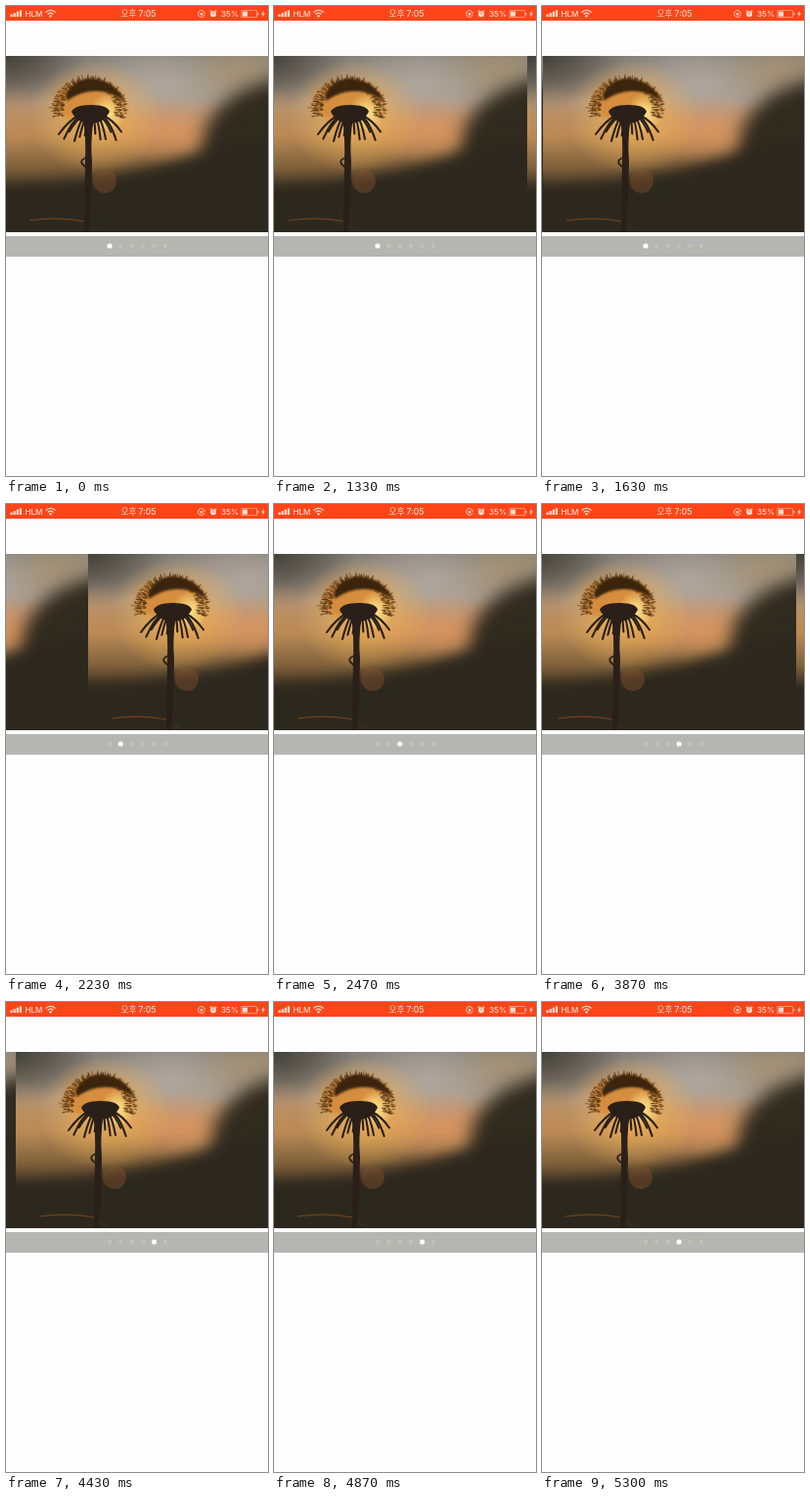
An HTML page with a canvas for the animation above (5.33 s loop, 268 by 480 pixels).

```html
<!DOCTYPE html>
<html lang="ko">
<head>
<meta charset="utf-8">
<title>Photo pager</title>
<style>
html, body { margin: 0; width: 100%; height: 100%; overflow: hidden; background: #fdfdfd; }
canvas { display: block; width: 100vw; height: 100vh; }
</style>
</head>
<body>
<canvas id="stage"></canvas>
<script>
const W = 268, H = 480, LOOP = 5330;
const PHOTO_Y = 51, PHOTO_H = 180;
const FONT = 'Inter, "Noto Sans CJK KR", "Noto Sans CJK", sans-serif';
const RED = '#ff4518', INK = '#ffdcd2', DARK = '#2a2019';
const scale = Math.max(1, window.devicePixelRatio || 1);

// Each swipe: start, end, page before, page after, flick strength
const swipes = [
  { start: 1300, end: 1700, from: 0, to: 1, flick: 5.4 },
  { start: 2100, end: 2470, from: 1, to: 2, flick: 8.7 },
  { start: 2770, end: 3100, from: 2, to: 3, flick: 5.3 },
  { start: 3840, end: 4330, from: 3, to: 4, flick: 8 },
  { start: 4400, end: 4930, from: 4, to: 3, flick: 10.6 },
  { start: 5000, end: 5300, from: 3, to: 2, flick: 7 }
];

function setup(canvas, w, h) {
  canvas.width = Math.round(w * scale);
  canvas.height = Math.round(h * scale);
  const g = canvas.getContext('2d');
  g.scale(scale, scale);
  return g;
}

function seeded(seed) {
  return () => (seed = (seed * 16807) % 2147483647) / 2147483647;
}

function glow(g, x, y, rx, ry, rgb, alpha) {
  g.save();
  g.translate(x, y);
  g.scale(rx, ry);
  const fill = g.createRadialGradient(0, 0, 0, 0, 0, 1);
  fill.addColorStop(0, `rgba(${rgb},${alpha})`);
  fill.addColorStop(0.45, `rgba(${rgb},${alpha * 0.62})`);
  fill.addColorStop(1, `rgba(${rgb},0)`);
  g.fillStyle = fill;
  g.fillRect(-1, -1, 2, 2);
  g.restore();
}

function soft(g, path, color, blur) {
  g.save();
  g.filter = `blur(${blur * scale}px)`;
  g.fillStyle = color;
  g.fill(new Path2D(path));
  g.restore();
}

function line(g, color, width, x1, y1, x2, y2, cx = (x1 + x2) / 2, cy = (y1 + y2) / 2) {
  g.strokeStyle = color;
  g.lineWidth = width;
  g.beginPath();
  g.moveTo(x1, y1);
  g.quadraticCurveTo(cx, cy, x2, y2);
  g.stroke();
}

function disc(g, x, y, r, color) {
  g.fillStyle = color;
  g.beginPath();
  g.arc(x, y, r, 0, Math.PI * 2);
  g.fill();
}

function drawSky(g) {
  const sky = g.createLinearGradient(0, 0, 0, PHOTO_H);
  sky.addColorStop(0, '#85807a');
  sky.addColorStop(0.25, '#a89684');
  sky.addColorStop(0.45, '#b48858');
  sky.addColorStop(0.62, '#84643c');
  sky.addColorStop(0.78, '#3a3022');
  g.fillStyle = sky;
  g.fillRect(0, 0, W, PHOTO_H);

  glow(g, 0, 0, 85, 55, '56,54,46', 0.85);
  glow(g, 160, 28, 80, 48, '178,172,164', 0.8);
  glow(g, 170, 76, 75, 36, '226,152,98', 0.75);
  glow(g, 92, 62, 70, 58, '250,182,84', 0.85);
  glow(g, 240, 12, 60, 36, '176,152,110', 0.6);
  glow(g, 10, 66, 40, 36, '206,140,72', 0.45);
}

function drawGround(g) {
  soft(g, 'M290 18 L250 32 Q228 40 212 60 Q196 78 204 112 L290 150 Z', '#302b1f', 9);
  soft(g, 'M-30 132 Q60 134 130 117 Q190 104 215 92 L300 80 V210 H-30 Z', '#2d281e', 7);
  disc(g, 101, 128, 12, 'rgba(140,84,44,0.4)');
  line(g, '#70431a', 1.2, 24, 168, 80, 169, 55, 164);
  line(g, '#49301a', 1, 78, 171, 94, 178);
}

function drawFlower(g) {
  const rand = seeded(77);
  const cx = 85, cy = 54;
  g.lineCap = 'round';

  // Backlit crown with a fuzzy dark rim
  soft(g, 'M50 58 Q44 26 85 25 Q126 26 121 60 L104 64 L66 64 Z', 'rgba(212,132,48,0.75)', 2.5);
  glow(g, 104, 58, 18, 20, '255,228,140', 1);
  soft(g, 'M62 38 Q72 22 88 23 Q112 25 121 46 Q108 35 92 36 Q78 35 62 46 Z', '#38240f', 1.3);
  for (let i = 0; i < 360; i++) {
    const a = Math.PI * (0.9 + 1.2 * rand());
    const r = 0.68 + 0.3 * rand();
    const x = cx + Math.cos(a) * 38 * r, y = cy + Math.sin(a) * 32 * r;
    const len = 1 + 3 * rand();
    line(g, 'rgba(70,42,14,0.5)', 1.1, x, y, x + Math.cos(a) * len, y + Math.sin(a) * len);
  }

  // Seed head and hanging bracts
  soft(g, 'M67 57 Q70 50 87 50 Q104 50 106 57 Q100 69 87 69 Q73 69 67 57 Z', DARK, 0.6);
  for (let i = 0; i < 13; i++) {
    const s = i / 6 - 1;
    const len = 18 + 5 * Math.sin(i * 2.4) - 4 * s * s;
    line(g, DARK, 2.1, 87 + s * 13, 61, 86 + s * 32, 66 + len, 87 + s * 23, 66);
  }

  // Stem
  soft(g, 'M79 64 H90 Q86 84 88 108 L87 150 L85 180 H80 L81 108 Q82 84 79 64 Z', DARK, 0.6);
  line(g, DARK, 1.8, 82, 104, 81, 113, 73, 107);
}

function makePhoto() {
  const canvas = document.createElement('canvas');
  const g = setup(canvas, W, PHOTO_H);
  drawSky(g);
  drawGround(g);
  drawFlower(g);
  return canvas;
}

function label(g, text, x, size, align = 'left') {
  g.font = `500 ${size}px ${FONT}`;
  g.textAlign = align;
  g.textBaseline = 'alphabetic';
  g.fillText(text, x, 11.2);
}

function drawStatus(g) {
  g.fillStyle = RED;
  g.fillRect(0, 0, W, 15);
  g.fillStyle = INK;
  for (let i = 0; i < 4; i++) {
    const h = 2.5 + i * 1.4;
    g.fillRect(4.5 + i * 3.1, 11 - h, 2.2, h);
  }
  label(g, 'HLM', 19.5, 8.1);
  label(g, '오후 7:05', 135.5, 8.6, 'center');
  label(g, '35%', 238, 8.1, 'right');

  // Wi-Fi
  g.strokeStyle = INK;
  g.lineWidth = 1.3;
  g.lineCap = 'butt';
  for (const r of [3.8, 6.6]) {
    g.beginPath();
    g.arc(45.5, 11, r, -Math.PI * 0.77, -Math.PI * 0.23);
    g.stroke();
  }
  disc(g, 45.5, 10.3, 1.2, INK);

  // Rotation lock
  g.lineWidth = 0.9;
  g.beginPath();
  g.arc(200, 8, 3.3, 0.3, Math.PI * 2);
  g.stroke();
  g.fillRect(198.7, 7.2, 2.6, 2.2);

  // Alarm
  disc(g, 212, 8.3, 3, INK);
  line(g, INK, 1.2, 208.8, 5.8, 210.3, 4.6);
  line(g, INK, 1.2, 215.2, 5.8, 213.7, 4.6);
  line(g, RED, 0.8, 212, 6.4, 212, 8.6);

  // Battery and bolt
  g.strokeStyle = 'rgba(255,220,210,0.6)';
  g.lineWidth = 0.8;
  g.strokeRect(241, 4.6, 15.5, 7);
  g.fillStyle = INK;
  g.fillRect(242, 5.6, 5, 5);
  g.fillRect(257.3, 6.8, 1, 2.6);
  g.fill(new Path2D('M263.8 4.6 L261.2 8.6 H262.8 L262.2 11.6 L265 7.5 H263.3 Z'));
}

function drawDots(g, page) {
  g.fillStyle = '#b5b5b1';
  g.fillRect(0, 235, W, 21);
  for (let i = 0; i < 6; i++) {
    const on = i === page;
    disc(g, 106 + i * 11.4, 245, on ? 2.6 : 2.2, on ? '#fffffa' : '#c2c2b4');
  }
}

// The dots follow only once a swipe has come to rest.
function pagerAt(t) {
  let page = 0;
  for (const s of swipes) {
    if (t < s.start) break;
    const u = Math.min(1, (t - s.start) / (s.end - s.start));
    if (u < 1 || s === swipes[swipes.length - 1]) {
      const p = 1 - Math.pow(1 - u * u, s.flick);
      return { page, scroll: s.from + (s.to - s.from) * p };
    }
    page = s.to;
  }
  return { page, scroll: page };
}

const g = setup(document.getElementById('stage'), W, H);
const photo = makePhoto();

function render(t) {
  const { page, scroll } = pagerAt(t);
  g.fillStyle = '#fdfdfd';
  g.fillRect(0, 0, W, H);
  const x = -Math.round((scroll - Math.floor(scroll)) * W);
  g.drawImage(photo, x, PHOTO_Y, W, PHOTO_H);
  if (x < 0) g.drawImage(photo, x + W, PHOTO_Y, W, PHOTO_H);
  drawStatus(g);
  drawDots(g, page);
}

const begin = performance.now();
function tick() {
  render((performance.now() - begin) % LOOP);
  requestAnimationFrame(tick);
}
tick();
</script>
</body>
</html>
```
